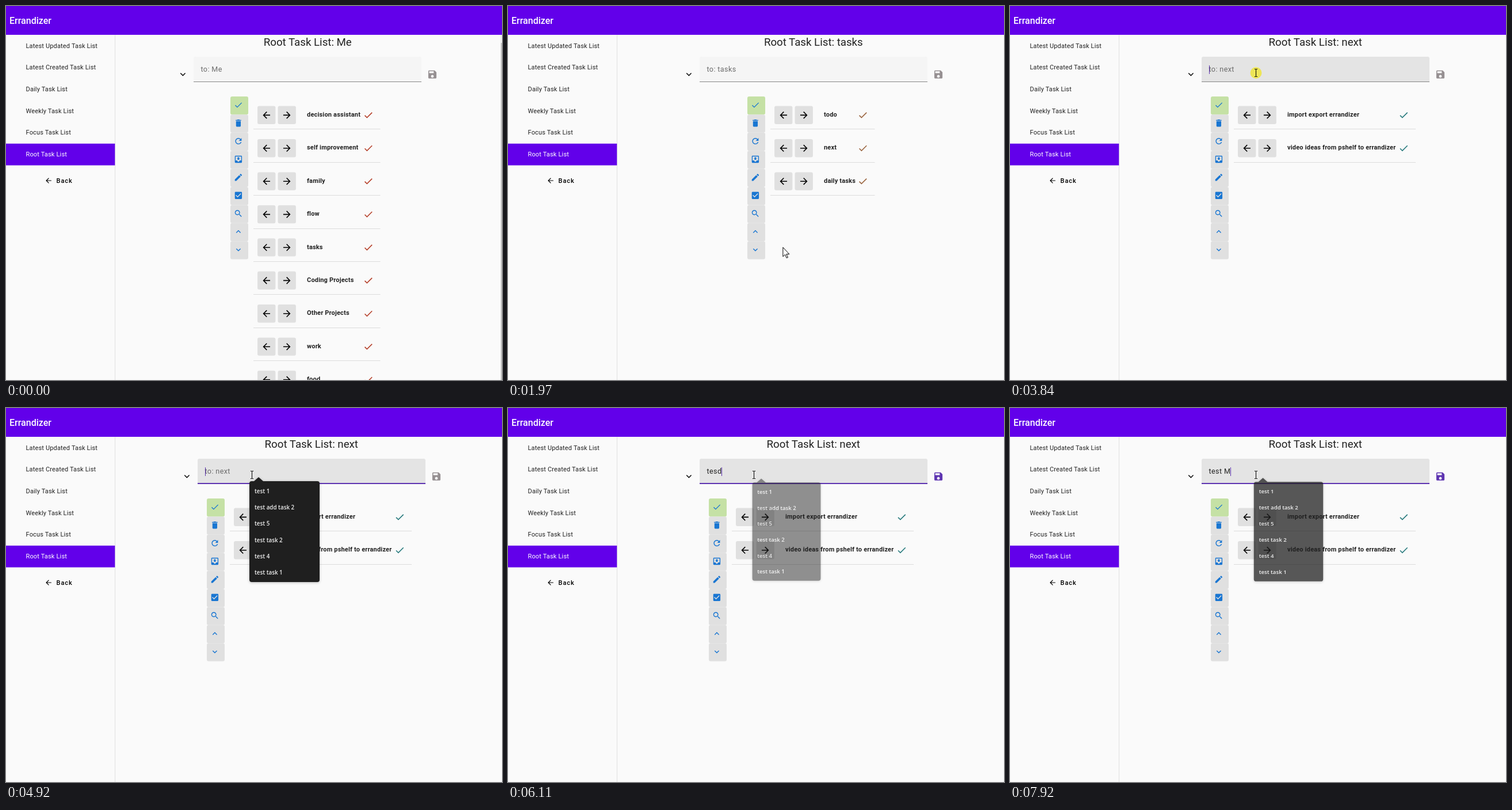
An HTML page for the animation above (7.99 s loop, 862x649 px).

```html
<!DOCTYPE html>
<html lang="en">
<head>
<meta charset="utf-8">
<title>Task list</title>
<style>
  html, body { margin: 0; width: 100%; height: 100%; overflow: hidden; background: #fafafa; }
  svg { display: block; font-family: Roboto, sans-serif; }
  text { white-space: pre; }
  .nav { font-size: 11px; letter-spacing: .16px; }
  .task { font-size: 11px; font-weight: 700; letter-spacing: .18px; fill: #212121; }
  .field { font-size: 12.56px; letter-spacing: .39px; }
  .hint { font: 600 9.8px "Open Sans", sans-serif; fill: #eee; }
</style>
</head>
<body>
<svg id="stage" width="862" height="649" viewBox="0 0 862 649"></svg>
<script>
const LOOP = 7990, STEP = 70, ROW = 57.4, TOOL = 31.4;
const PURPLE = '#6200ea', ACCENT = '#5e35b1';

const ICONS = {
  done: 'M9 16.17L4.83 12l-1.42 1.41L9 19 21 7l-1.41-1.41z',
  remove: 'M6 19c0 1.1.9 2 2 2h8c1.1 0 2-.9 2-2V7H6v12zM19 4h-3.5l-1-1h-5l-1 1H5v2h14V4z',
  refresh: 'M17.65 6.35C16.2 4.9 14.21 4 12 4c-4.42 0-7.99 3.58-7.99 8s3.57 8 7.99 8c3.73 0 6.84-2.55 7.73-6h-2.08c-.82 2.33-3.04 4-5.65 4-3.31 0-6-2.69-6-6s2.69-6 6-6c1.66 0 3.14.69 4.22 1.78L13 11h7V4z',
  inbox: 'M19 3H5c-1.1 0-2 .9-2 2v14c0 1.1.9 2 2 2h14c1.1 0 2-.9 2-2V5c0-1.1-.9-2-2-2zm0 12h-4c0 1.66-1.35 3-3 3s-3-1.34-3-3H5V5h14v10zm-3-5h-2V7h-4v3H8l4 4z',
  edit: 'M3 17.25V21h3.75L17.81 9.94l-3.75-3.75zM20.71 7.04c.39-.39.39-1.02 0-1.41l-2.34-2.34c-.39-.39-1.02-.39-1.41 0l-1.83 1.83 3.75 3.75z',
  box: 'M19 3H5c-1.1 0-2 .9-2 2v14c0 1.1.9 2 2 2h14c1.1 0 2-.9 2-2V5c0-1.1-.9-2-2-2zm-9 14l-5-5 1.41-1.41L10 14.17l7.59-7.59L19 8z',
  search: 'M15.5 14h-.79l-.28-.27C15.41 12.59 16 11.11 16 9.5 16 5.91 13.09 3 9.5 3S3 5.91 3 9.5 5.91 16 9.5 16c1.61 0 3.09-.59 4.23-1.57l.27.28v.79l5 4.99L20.49 19zm-6 0C7.01 14 5 11.99 5 9.5S7.01 5 9.5 5 14 7.01 14 9.5 11.99 14 9.5 14z',
  up: 'M12 8l-6 6 1.41 1.41L12 10.83l4.59 4.58L18 14z',
  down: 'M16.59 8.59L12 13.17 7.41 8.59 6 10l6 6 6-6z',
  back: 'M20 11H7.83l5.59-5.59L12 4l-8 8 8 8 1.41-1.41L7.83 13H20z',
  forward: 'M12 4l-1.41 1.41L16.17 11H4v2h12.17l-5.58 5.59L12 20l8-8z',
  save: 'M17 3H5c-1.1 0-2 .9-2 2v14c0 1.1.9 2 2 2h14c1.1 0 2-.9 2-2V7zm-5 16c-1.66 0-3-1.34-3-3s1.34-3 3-3 3 1.34 3 3-1.34 3-3 3zm3-10H5V5h10z'
};
const TOOLS = ['done', 'remove', 'refresh', 'inbox', 'edit', 'box', 'search', 'up', 'down'];
const NAV = ['Latest Updated', 'Latest Created', 'Daily', 'Weekly', 'Focus', 'Root'];
const HINTS = ['test 1', 'test add task 2', 'test 5', 'test task 2', 'test 4', 'test task 1'];

const PAGES = [
  { start: 0, name: 'Me', left: 390, right: 650.5, tick: '#b5402a',
    tasks: ['decision assistant', 'self improvement', 'family', 'flow', 'tasks',
      'Coding Projects', 'Other Projects', 'work', 'food'] },
  { start: 1900, name: 'tasks', left: 416, right: 637.5, tick: '#9a6540',
    tasks: ['todo', 'next', 'daily tasks'] },
  { start: 2930, name: 'next', left: 349, right: 705, tick: '#26797c',
    tasks: ['import export errandizer', 'video ideas from pshelf to errandizer'] }
];

// time, x, y of the pointer
const POINTER = [[130, 821, 630], [620, 522, 405], [750, 526, 441], [1150, 526, 441],
  [1290, 475.5, 424], [1560, 477, 423], [1900, 477, 423], [2660, 512, 247],
  [3150, 512, 247], [3630, 427.5, 116], [LOOP, 427.5, 116]];
const CLICKS = [[1560, 1700], [2860, 2930], [3840, 3910]];
const FOCUS = 3840;
const EDITS = [[FOCUS, ''], [5450, 't'], [5580, 'te'], [5710, 'tes'], [5910, 'tesd'],
  [6850, 'tes'], [6920, 'test'], [7520, 'test '], [7850, 'test M']];

const rect = (x, y, w, h, fill, more = '') =>
  `<rect x="${x}" y="${y}" width="${w}" height="${h}" fill="${fill}" ${more}/>`;
const text = (x, y, str, more = '') => `<text x="${x}" y="${y}" ${more}>${str}</text>`;
const icon = (name, cx, cy, size, fill, more = '') =>
  `<path d="${ICONS[name]}" fill="${fill}" fill-rule="evenodd" ${more}
    transform="translate(${cx - size / 2} ${cy - size / 2}) scale(${size / 24})"/>`;

const shell = () =>
  rect(0, 0, 862, 50, PURPLE) +
  text(6, 31, 'Errandizer', 'font-size="16" font-weight="500" fill="#fff"') +
  rect(189, 50, 1, 599, '#e0e0e0') + rect(0, 238.8, 189.3, 37.7, PURPLE) +
  NAV.map((n, i) => text(34.5, 72.6 + 37.7 * i, n + ' Task List',
    `class="nav" fill="${i == 5 ? '#fff' : '#212121'}"`)).join('') +
  icon('back', 74, 303, 14.5, '#000') +
  text(87.5, 306.6, 'Back', 'font-size="11" font-weight="500" letter-spacing=".98"');

const taskRow = (page, label, i) => {
  const y = 173.6 + ROW * i, x = page.left;
  return rect(x + 40, Math.round(213.4 + ROW * i), page.right - x - 40, 1, '#dcdcdc') +
    ['back', 'forward'].map((name, k) => {
      const bx = x + 47 + 35.5 * k;
      return rect(bx, y, TOOL, TOOL, '#e0e0e0', 'rx="3"') +
        icon(name, bx + 15.7, y + 15.8, 18.84, '#000');
    }).join('') +
    text(x + 133, y + 18.4, label, 'class="task"') +
    icon('done', page.right - 20.8, y + 15.7, 18.84, page.tick);
};

const pageView = (page, i) => `<g id="page${i}">` +
  text(i ? 530.8 : 524.3, 69, 'Root Task List: ' + page.name,
    'font-size="18.7" text-anchor="middle" fill="#212121"') +
  TOOLS.map((name, k) => {
    const y = 157 + TOOL * k;
    return rect(page.left, y, 31, TOOL, k ? '#e0e0e0' : '#c5e1a5', 'rx="3"') +
      icon(name, page.left + 13.9, y + 14.8, 16.5, '#1976d2');
  }).join('') +
  page.tasks.map((label, k) => taskRow(page, label, k)).join('') +
  (i ? '' : rect(859, 50, 3, 599, '#f1f1f1') + rect(860, 64, 2, 585, '#c1c1c1')) + '</g>';

const field = () => '<g id="field">' +
  icon('down', 307.4, 118.6, 18.84, '#111') +
  '<path id="fill" d="M326 132V91q0-3 3-3h390q3 0 3 3v41z"/>' +
  rect(326, 131, 396, 1, '#868686') +
  rect(-198, 130, 396, 2, ACCENT, 'id="line"') +
  text(338.5, 114, '', 'id="value" class="field"') +
  rect(0, 103, 1, 15, ACCENT, 'id="caret"') +
  icon('save', 741, 118.8, 18.84, '', 'id="save"') + '</g>';

const popup = () => '<g id="popup"><path d="M427 127h4l8-7 8 7h94q4 0 4 4v167q0 4-4 4H427q-4 0-4-4V131q0-4 4-4z" fill="#1f1f1f" style="filter:drop-shadow(0 1px 2px #0004)"/>' +
  HINTS.map((h, i) => text(432, 147.6 + 28.3 * i, h, 'class="hint"')).join('') + '</g>';

const cursors = () => '<circle id="click" r="10" fill="#f0e630" opacity=".78"/><g id="pointer" fill="#fff" stroke="#000">' +
  '<path id="arrow" d="M0 0v16l3.7-3.5 2.6 6 2.3-1-2.6-5.7h5z"/>' +
  '<path id="hand" d="M-1.5 1.5a1.5 1.5 0 0 1 3 0V7q3-.6 3 .8 2.6-.5 2.6 1 1.9-.2 1.9 1.6V13c0 2-1 3-1.4 5.3H.5C-.5 15.500-3 13.500-4.500 11c-.8-1.600 1-2.400 2-1.200l1 1zM1.500 7v3M4.500 8v2.500M7 9v2"/>' +
  '<path id="beam" fill="none" d="M-2.500-6.500h2L0-6l.5-.5h2M0-6V6M-2.500 6.500h2L0 6l.5.5h2"/></g>';

document.getElementById('stage').innerHTML = shell() + PAGES.map(pageView).join('') +
  rect(0, 0, TOOL, TOOL, '#000', 'id="hover" rx="3"') + field() + popup() + cursors();

const el = id => document.getElementById(id);
const show = (id, on) => el(id).style.display = on ? '' : 'none';
const attr = (id, name, value) => el(id).setAttribute(name, value);
const ramp = (t, start, length) =>
  Math.min(1, Math.max(0, Math.floor((t - start) / STEP) * STEP / length));
const latest = (list, t, key) => list.filter(e => e[key] <= t).pop();

function pointerAt(t) {
  const i = POINTER.findIndex(p => p[0] > t);
  if (i < 1) return null;
  const [t0, x0, y0] = POINTER[i - 1], [t1, x1, y1] = POINTER[i];
  const p = ramp(t, t0, t1 - t0), k = p * p * (3 - 2 * p);
  return [x0 + (x1 - x0) * k, y0 + (y1 - y0) * k];
}

function hoveredButton(page, [x, y]) {
  const row = Math.floor((y - 173.6) / ROW), top = 173.6 + ROW * row;
  if (row < 0 || row >= page.tasks.length || y > top + TOOL) return null;
  const bx = [page.left + 47, page.left + 82.5].find(b => x >= b && x <= b + TOOL);
  return bx && [bx, top];
}

function draw(t) {
  const page = latest(PAGES, t, 'start'), index = PAGES.indexOf(page);
  PAGES.forEach((p, i) => show('page' + i, i == index));

  const pos = pointerAt(t), button = pos && hoveredButton(page, pos);
  const pressed = CLICKS.some(([a, b]) => t >= a && t < b);
  const inField = index && pos[1] < 132;
  show('pointer', pos);
  show('click', pressed);
  show('hover', button);
  if (pos) {
    const hand = button || (t >= 2930 && t < 3150);
    const at = `translate(${pos})`;
    attr('pointer', 'transform', at);
    attr('click', 'transform', at);
    show('hand', hand);
    show('beam', inField && !hand);
    show('arrow', !inField && !hand);
  }
  if (button) {
    attr('hover', 'transform', `translate(${button})`);
    attr('hover', 'opacity', pressed ? .1 : .035);
  }

  const edit = latest(EDITS, t, 0), typed = edit ? edit[1] : '';
  const value = el('value');
  attr('field', 'transform', `translate(${index ? 7 : 0})`);
  attr('fill', 'fill', edit ? '#e4e4e4' : inField ? '#ededed' : '#f5f5f5');
  attr('line', 'transform', `translate(524) scale(${ramp(t, FOCUS, 210)} 1)`);
  attr('save', 'fill', typed ? ACCENT : '#969092');
  value.textContent = typed || 'to: ' + page.name;
  attr('value', 'fill', typed ? '#212121' : '#6b6b6b');
  show('caret', edit && (t - edit[0]) % 1060 < 530);
  attr('caret', 'x', Math.round(338.5 + (typed ? value.getComputedTextLength() : 0)));

  const alpha = ramp(t, 3910, 140) - ramp(t, 5910, 270) + ramp(t, 6770, 140) - ramp(t, 7850, 270);
  attr('popup', 'opacity', alpha);
  attr('popup', 'transform', `translate(484 214) scale(${.95 + .05 * alpha}) translate(-484 -214)`);
}

function tick() {
  draw(performance.now() % LOOP);
  requestAnimationFrame(tick);
}
tick();
</script>
</body>
</html>
```
